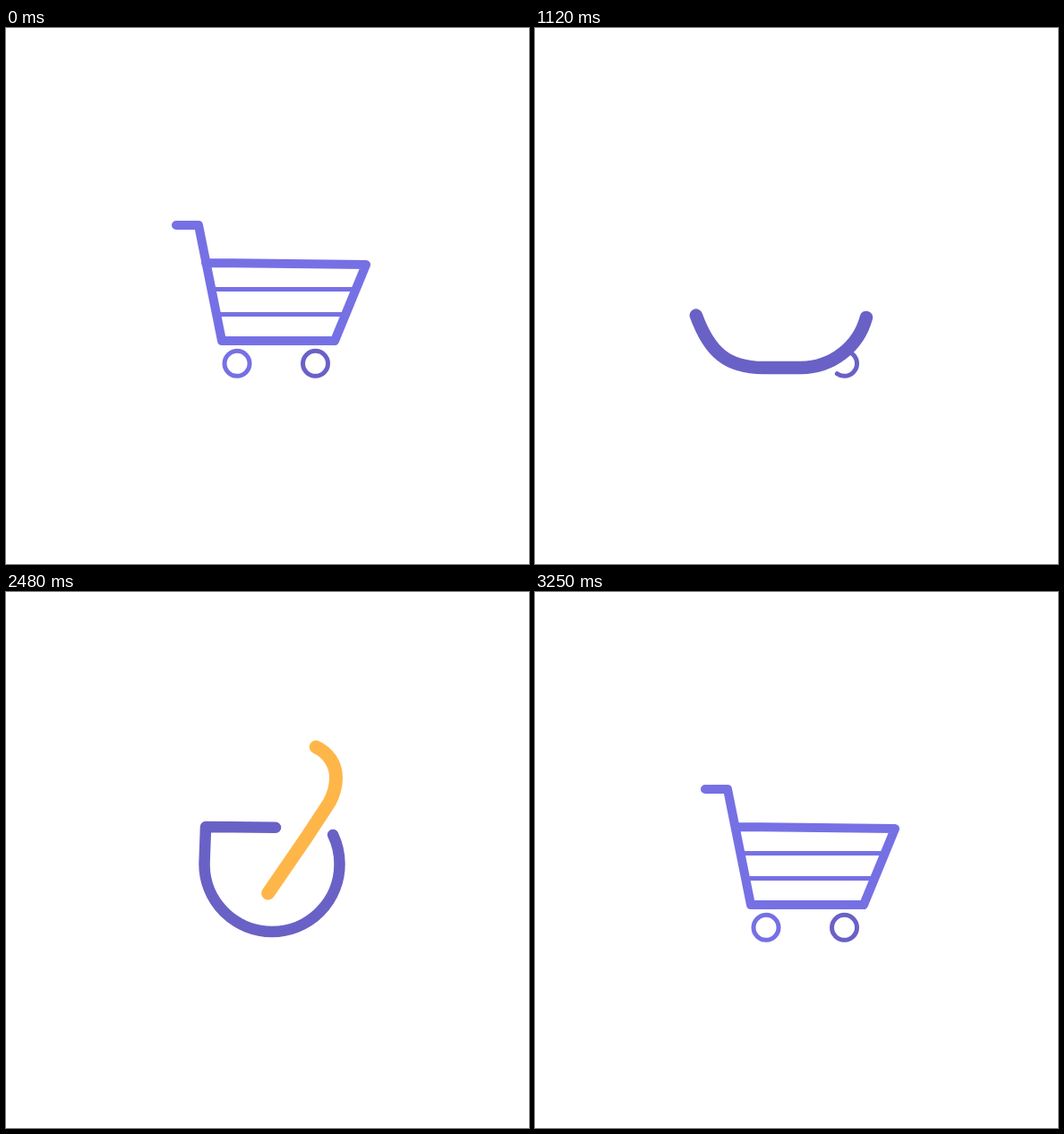
An HTML page for the animation above (3.32 s loop, 584 px wide and 598 px high).

```html
<!DOCTYPE html>
<html lang="en">
<head>
<meta charset="utf-8">
<title>Cart checkout loop</title>
<style>
  html, body { margin: 0; width: 100%; height: 100%; overflow: hidden; background: #fff; }
  svg { display: block; }
  path { fill: none; stroke: #7670e5; stroke-width: 10; stroke-linecap: round; stroke-linejoin: round; }
  .thin { stroke-width: 5; }
  .dark { stroke: #6a61c6; }
  .tick { stroke: #ffb649; stroke-width: 15; }
</style>
</head>
<body>
<svg width="584" height="598" viewBox="0 0 584 598">
  <path id="shelf1" class="thin" d="M230 291.5H389"/>
  <path id="shelf2" class="thin" d="M236 319.5H378"/>
  <path id="wheelL" class="thin" d="M258 360.3a14 14 0 0 0 0 28a14 14 0 0 0 0 -28"/>
  <path id="wheelR" class="thin dark" d="M345.5 360.3a14 14 0 0 0 0 28a14 14 0 0 0 0 -28"/>
  <path id="wheelIn" class="thin dark" d="M346 349Q359.5 354 359.5 374.3a14 14 0 0 1 -28 0a14 14 0 0 1 28 0"/>
  <path id="tick" class="tick" d="M261 308L291 338.5L335 274.5L361 235C366 226 368.5 216 368.5 207C368.5 186 351 169.5 330 169.5C316 169.5 306 179 306 193V258"/>
  <path id="cart" d="M190 220H215L241 349H367L402 264L223 262"/>
  <path id="ring" class="dark" d="M190 220C174 220 164 230 164 248C164 270 171 300 180 321C195 362 215 379 255 379H297A75.5 75.5 0 0 0 297 228A75.5 75.5 0 0 0 297 379"/>
  <path id="unwind" d="M221.5 303.5A75.5 75.5 0 0 1 372.5 303.5A75.5 75.5 0 0 1 221.5 303.5L223 262L402 264L367 349H241L215 220H190"/>
</svg>
<script>
const LOOP = 3320, STEP = 70, HOLD = 1680, RETURN = 2270;
const paths = Object.fromEntries([...document.querySelectorAll('path')].map(p => [p.id, p]));
const length = Object.fromEntries(Object.entries(paths).map(([id, p]) => [id, p.getTotalLength()]));

// Smooth monotone interpolation through [time, value] keys.
function along(t, ...keys) {
  const last = keys.length - 1;
  if (t <= keys[0][0]) return keys[0][1];
  if (t >= keys[last][0]) return keys[last][1];
  const rate = i => (keys[i + 1][1] - keys[i][1]) / (keys[i + 1][0] - keys[i][0]);
  const slope = i => {
    if (i === 0 || i === last) return 0;
    const a = rate(i - 1), b = rate(i);
    return a * b > 0 ? 2 * a * b / (a + b) : 0;
  };
  const i = keys.findIndex(k => k[0] > t) - 1;
  const [t0, v0] = keys[i], [t1, v1] = keys[i + 1];
  const d = t1 - t0, u = (t - t0) / d, w = 1 - u;
  return v0 * w * w * (1 + 2 * u) + v1 * u * u * (3 - 2 * u)
    + d * u * w * (slope(i) * w - slope(i + 1) * u);
}

function trim(id, from, to) {
  const p = paths[id], visible = to - from > 0.5;
  p.style.display = visible ? '' : 'none';
  if (!visible) return;
  p.style.strokeDasharray = `${to - from} 9999`;
  p.style.strokeDashoffset = -from;
}

const mix = (a, b, u) => `rgb(${a.map((v, i) => Math.round(v + (b[i] - v) * u))})`;

function cartToTick(t) {
  trim('cart', 0, along(t, [0, length.cart], [630, 100], [770, 0]));
  trim('ring', along(t, [770, 0], [1120, 118], [1400, 253], [1540, 260]),
    along(t, [480, 0], [560, 18], [630, 43], [1120, 362], [1400, 713], [1540, length.ring]));
  paths.ring.style.strokeWidth = along(t, [630, 10], [1120, 14.5], [1400, 15]);
  for (const id of ['shelf1', 'shelf2'])
    trim(id, 0, along(t, [0, length[id]], [490, 0]));
  trim('wheelL', along(t, [630, 0], [1050, length.wheelL]), length.wheelL);
  trim('wheelR', along(t, [840, 0], [1120, 35], [1260, length.wheelR]), length.wheelR);
  trim('tick', 0, along(t, [1190, 0], [1400, 74], [1610, 120.5]));
  trim('unwind', 0, 0);
  trim('wheelIn', 0, 0);
}

function tickToCart(t) {
  trim('tick', along(t, [2270, 0], [2760, 177], [3040, length.tick]),
    along(t, [2270, 120.5], [2690, length.tick]));
  trim('unwind', along(t, [2270, 0], [2760, 516]),
    along(t, [2270, 474], [2760, 857], [3180, length.unwind]));
  paths.unwind.style.strokeWidth = along(t, [2270, 15], [2690, 10]);
  paths.unwind.style.stroke = mix([106, 97, 198], [118, 112, 229], along(t, [2760, 0], [3180, 1]));
  for (const id of ['shelf1', 'shelf2'])
    trim(id, 0, along(t, [2830, 0], [3200, length[id]]));
  trim('wheelL', 0, along(t, [2830, 0], [3180, length.wheelL]));
  trim('wheelIn', along(t, [2900, 0], [3180, length.wheelIn - 88]),
    along(t, [2690, 0], [2760, 15], [3180, length.wheelIn]));
  for (const id of ['cart', 'ring', 'wheelR']) trim(id, 0, 0);
}

function draw(now) {
  const t = now % LOOP;
  if (t < RETURN) cartToTick(Math.min(HOLD, Math.floor(t / STEP) * STEP));
  else tickToCart(RETURN + Math.floor((t - RETURN) / STEP) * STEP);
}

const start = performance.now();
function tick() {
  draw(performance.now() - start);
  requestAnimationFrame(tick);
}
tick();
</script>
</body>
</html>
```
